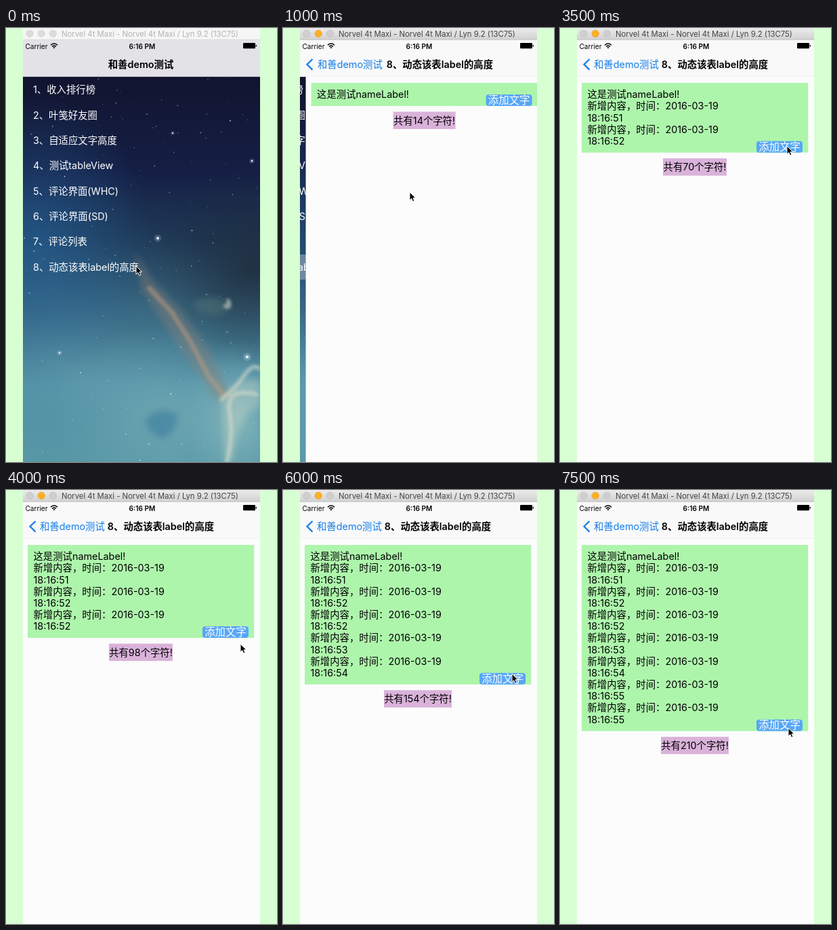
These frames come from a looping animation (400 px wide and 640 px high, 8 s). An HTML page:

```html
<!DOCTYPE html>
<html lang="zh-CN">
<head>
<meta charset="utf-8">
<title>Label height demo</title>
<style>
  html, body { margin: 0; width: 100%; height: 100%; overflow: hidden; background: #d8ffd3; }
  svg { display: block; width: 400px; height: 640px; }
  text { font: 14.37px Inter, "Noto Sans CJK SC", "Noto Sans CJK", sans-serif; white-space: pre; }
  .bold { font-weight: 600; }
  .mid { text-anchor: middle; }
  #caption { font-size: 11.3px; }
  .status { font-size: 10.1px; }
  #button text { font-size: 15.4px; }
</style>
</head>
<body>
<svg viewBox="0 0 400 640">
  <defs>
    <linearGradient id="sky" x2="0" y2="1">
      <stop offset="0" stop-color="#11142f"/>
      <stop offset=".25" stop-color="#151f45"/>
      <stop offset=".42" stop-color="#1f3a58"/>
      <stop offset=".58" stop-color="#36637c"/>
      <stop offset=".8" stop-color="#4f90a5"/>
      <stop offset="1" stop-color="#5797a6"/>
    </linearGradient>
    <radialGradient id="blueGlow"><stop stop-color="#2667a0" stop-opacity=".6"/><stop offset="1" stop-color="#2667a0" stop-opacity="0"/></radialGradient>
    <radialGradient id="dusk"><stop stop-color="#1d2836" stop-opacity=".75"/><stop offset="1" stop-color="#1d2836" stop-opacity="0"/></radialGradient>
    <radialGradient id="paleGlow"><stop stop-color="#a9d0cc" stop-opacity=".7"/><stop offset="1" stop-color="#8abcc4" stop-opacity="0"/></radialGradient>
    <linearGradient id="chrome" x2="0" y2="1"><stop stop-color="#ebebeb"/><stop offset="1" stop-color="#d2d2d2"/></linearGradient>
    <filter id="soft" x="-50%" y="-50%" width="200%" height="200%"><feGaussianBlur stdDeviation="5"/></filter>
    <filter id="fine" x="-50%" y="-50%" width="200%" height="200%"><feGaussianBlur stdDeviation="2.2"/></filter>
    <clipPath id="screen"><rect x="25" y="72" width="350" height="568"/></clipPath>
  </defs>
  <rect width="400" height="640" fill="#d8ffd3"/>

  <g clip-path="url(#screen)">
    <g id="home">
      <rect x="25" y="72" width="350" height="568" fill="url(#sky)"/>
      <ellipse cx="45" cy="320" rx="170" ry="220" fill="url(#blueGlow)"/>
      <ellipse cx="365" cy="355" rx="150" ry="150" fill="url(#dusk)"/>
      <ellipse cx="90" cy="500" rx="160" ry="90" fill="url(#paleGlow)" opacity=".2"/>
      <ellipse cx="235" cy="570" rx="170" ry="130" fill="url(#paleGlow)" opacity=".45"/>
      <ellipse cx="345" cy="575" rx="85" ry="115" fill="url(#paleGlow)" opacity=".75"/>
      <g filter="url(#soft)">
        <path d="M190 330L216 372 258 415 300 475 335 545 312 552 262 480 226 425 200 385Z" fill="#8d7f78" opacity=".4"/>
        <path d="M275 405Q310 385 332 412 318 430 285 418Z" fill="#6c8a84" opacity=".3"/>
        <path d="M205 580Q220 555 252 568 256 590 232 606 212 600 205 580Z" fill="#3f82a0" opacity=".7"/>
        <path d="M318 550Q345 510 375 520V560Q345 560 335 640H322Z" fill="#c0d2c4" opacity=".4"/>
      </g>
      <g filter="url(#fine)" fill="none" stroke-linecap="round">
        <path d="M212 384L245 420 272 462 300 515 322 542" stroke="#bd9a80" stroke-width="7" opacity=".55"/>
        <path d="M324 410Q332 414 328 402M318 548Q340 530 352 512T374 502M326 640Q336 600 330 565T370 540" stroke="#d5ddcb" stroke-width="6" opacity=".6"/>
      </g>
      <g id="stars" fill="#e8f3ff"></g>
      <rect id="highlight" x="25" y="334" width="350" height="37" fill="#d5d5d9" opacity=".4"/>
      <g id="rows" fill="#fff"></g>
    </g>
    <g id="page">
      <rect x="24" y="72" width="352" height="568" fill="#fcfcfc"/>
      <rect id="box" x="32" y="81" width="334.2" fill="#aef5ac"/>
      <g id="lines"></g>
      <g id="button">
        <rect x="290" y="0" width="68" height="17" rx="4" fill="#57a7f6"/>
        <text class="mid" x="324" y="14" fill="#fff">添加文字</text>
      </g>
      <g id="total">
        <rect y="0" height="25.5" fill="#d9b2d9"/>
        <text class="mid" x="199" y="18.2"></text>
      </g>
    </g>
  </g>

  <g id="homeNav">
    <rect x="25" y="17" width="350" height="55" fill="#e2e2e7"/>
    <path d="M25 71.7H375" stroke="#a5a5ac" stroke-width=".6"/>
    <text class="bold mid" x="199" y="59.2">和善demo测试</text>
  </g>
  <g id="pageNav">
    <rect x="25" y="17" width="350" height="55" fill="#f9f9fa"/>
    <path d="M25 71.6H375" stroke="#efeff0" stroke-width=".8"/>
    <path d="M43.5 46L35.5 53.8 43.5 61.6" fill="none" stroke="#157de6" stroke-width="2.3"/>
    <text id="back" y="59.2" fill="#157de6">和善demo测试</text>
    <text id="heading" class="bold mid" y="59.2">8、动态该表label的高度</text>
  </g>

  <g id="statusBar">
    <text class="status" x="28.5" y="30.5">Carrier</text>
    <path d="M66 25.2Q71 20.8 76 25.2M68 27.4Q71 24.8 74 27.4" fill="none" stroke="#000" stroke-width="1.5"/>
    <path d="M69.4 28.6Q71 27.2 72.6 28.6L71 30.4Z"/>
    <text class="status bold mid" x="201" y="30.6">6:16 PM</text>
    <rect x="350" y="22" width="18" height="8.3" rx="1.2"/>
    <rect x="368.7" y="24.8" width="1.3" height="2.8" rx=".6"/>
  </g>

  <rect id="bar" x="25" y="0" width="350" height="17"/>
  <path id="barEdge" d="M25 17.2H375" stroke-width=".8"/>
  <g id="lights" stroke-width=".6"><circle cx="35" cy="8.3" r="5.2"/><circle cx="52.2" cy="8.3" r="5.2"/><circle cx="69.3" cy="8.3" r="5.2"/></g>
  <text id="caption" x="82" y="12.6">Norvel 4t Maxi - Norvel 4t Maxi / Lyn 9.2 (13C75)</text>

  <g id="cursor">
    <circle id="ring" r="17.8" fill="#fff" fill-opacity=".15" stroke="#000" stroke-width="2.5"/>
    <path d="M0 0V12.2L2.8 9.6 4.7 14 6.9 13 5 8.8H8.8Z" stroke="#fff" stroke-width="1" stroke-linejoin="round"/>
  </g>
</svg>
<script>
const LOOP = 8000, STEP = 500, GROUP = 34.35, ROW = 37.35;
const $ = id => document.getElementById(id);
const set = (el, attrs) => { for (const key in attrs) el.setAttribute(key, attrs[key]); return el; };
const add = (parent, tag, attrs, text = '') => {
  const el = set(document.createElementNS('http://www.w3.org/2000/svg', tag), attrs);
  el.textContent = text;
  return parent.appendChild(el);
};
const show = (el, on) => { el.style.display = on ? '' : 'none'; };

const menu = ['收入排行榜', '叶笺好友圈', '自适应文字高度', '测试tableView',
  '评论界面(WHC)', '评论界面(SD)', '评论列表', '动态该表label的高度'];
menu.forEach((name, i) => add($('rows'), 'text', { x: 40, y: 96.2 + ROW * i }, `${i + 1}、${name}`));

let seed = 11;
const random = () => (seed = seed * 16807 % 2147483647) / 2147483647;
for (let i = 0; i < 260; i++) {
  const r = .35 + .75 * random() ** 3;
  add($('stars'), 'circle', { cx: 25 + 350 * random(), cy: 72 + 568 * random(), r, opacity: .25 + .5 * random() });
}
[[224, 310, 2.6], [356, 485, 3], [79, 479, 1.8], [363, 196, 1.8], [246, 155, 1.4]].forEach(([cx, cy, r]) => {
  add($('stars'), 'circle', { cx, cy, r: r * 2, opacity: .2 });
  add($('stars'), 'circle', { cx, cy, r: r * .75 });
});

// Each tap: when it lands and the seconds shown in its stamp.
const taps = [[2500, 51], [3500, 52], [4000, 52], [4500, 53], [5500, 54], [6500, 55], [7000, 55]];
const addLine = (text, i) => add($('lines'), 'text', { x: 40.5, y: 103.2 + GROUP / 2 * i }, text);
addLine('这是测试nameLabel!', 0);
const stamps = taps.map(([, sec], i) => [
  addLine('新增内容，时间：2016-03-19', 2 * i + 1),
  addLine(`18:16:${sec}`, 2 * i + 2)
]);

const pointer = [[192, 351], [191, 351], [187, 242], [187, 240], [235, 230], [313, 128], [330, 140], [335, 174],
  [346, 227], [341, 214], [338, 247], [338, 256], [338, 271], [332, 293], [335, 318], [337, 351]];
const presses = [500, 5000];

function draw(ms) {
  const step = Math.floor(ms / STEP), time = step * STEP;
  const active = time >= 500, pushed = time >= 1000, slide = time === 1000 ? 9.6 : 0;
  const count = taps.filter(([at]) => time >= at).length;

  set($('bar'), { fill: active ? 'url(#chrome)' : '#f6f6f6' });
  set($('barEdge'), { stroke: active ? '#b5b5b5' : '#d6d6d6' });
  [...$('lights').children].forEach((light, i) => set(light, active && i === 1
    ? { fill: '#fdb025', stroke: '#dd9a2a' }
    : { fill: active ? '#cfcfcf' : '#dcdcdc', stroke: active ? '#b9b9b9' : '#d0d0d0' }));
  set($('caption'), { fill: active ? '#444' : '#b3b3b3' });

  show($('homeNav'), !pushed);
  show($('pageNav'), pushed);
  show($('page'), pushed);
  show($('home'), !pushed || slide);
  show($('highlight'), active);
  set($('home'), { transform: `translate(${pushed ? slide * .3 - 105 : 0})` });
  set($('page'), { transform: `translate(${slide})` });
  set($('back'), { x: 50 + slide * .1 });
  set($('heading'), { x: 228.5 + slide * .3 });

  const bottom = 115 + GROUP * count, chars = 14 + 28 * count;
  set($('box'), { height: bottom - 81 });
  stamps.forEach((pair, i) => pair.forEach(line => show(line, i < count)));
  set($('button'), { transform: `translate(0 ${bottom - 17})` });
  set($('total'), { transform: `translate(0 ${bottom + 8.5})` });
  const width = chars > 99 ? 100 : count ? 94 : 92;
  set($('total').children[0], { x: 199 - width / 2, width });
  $('total').children[1].textContent = `共有${chars}个字符!`;

  set($('cursor'), { transform: `translate(${pointer[step]})` });
  show($('ring'), presses.includes(time));
}

const start = performance.now();
(function tick() {
  draw((performance.now() - start) % LOOP);
  requestAnimationFrame(tick);
})();
</script>
</body>
</html>
```
